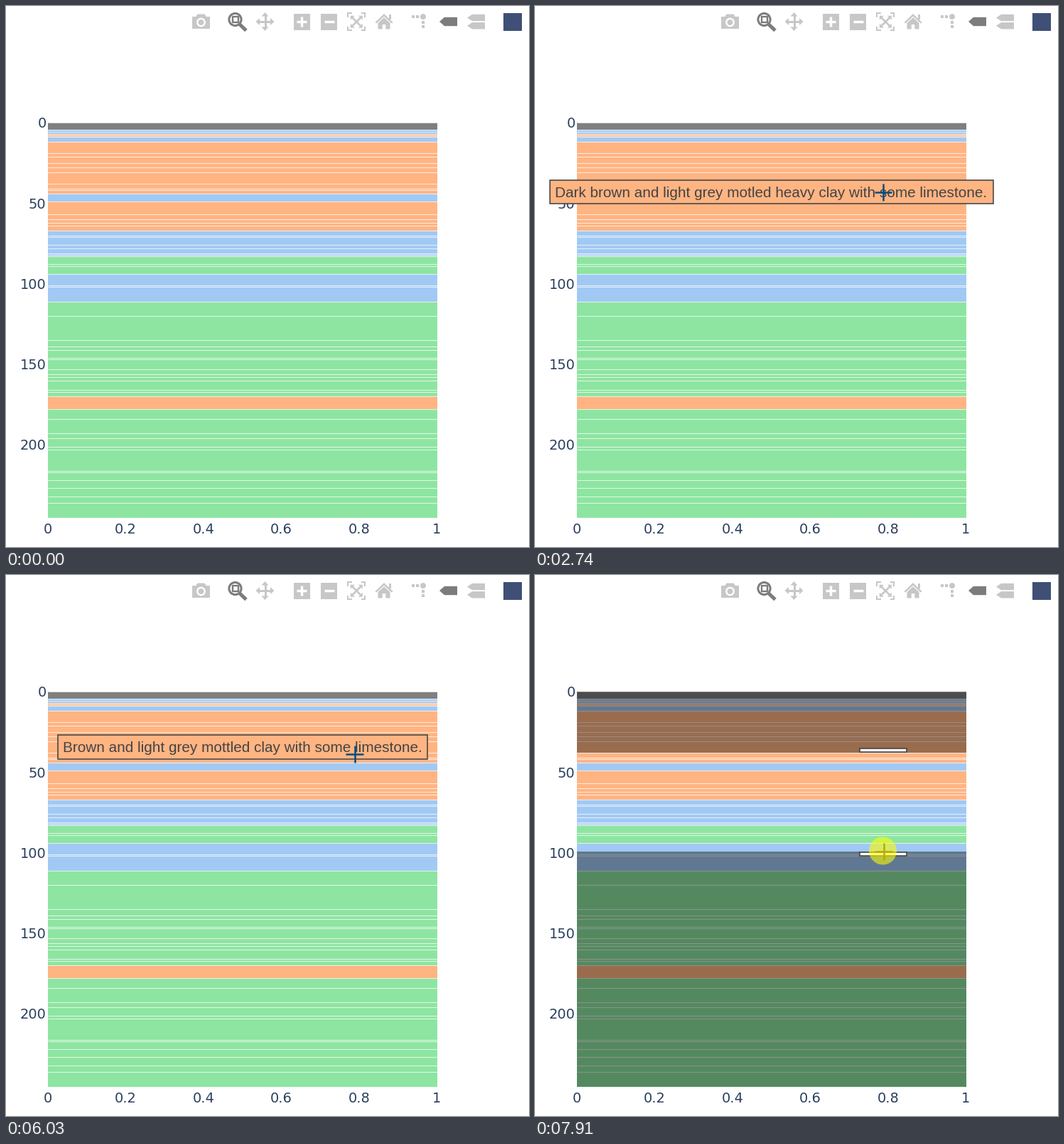
Animation, 736 px wide and 761 px high, one loop 8 s. Source, as a matplotlib script:

```python
import matplotlib.pyplot as plt
from matplotlib.animation import FuncAnimation
from matplotlib.collections import LineCollection
from matplotlib.colors import to_rgb
from matplotlib.patches import Circle, Polygon, Rectangle

W, H, DPI = 736, 761, 64
PT = 72 / DPI
INTERVAL, FRAMES = 40, 200

GREY, BLUE, ORANGE, GREEN = "#7f7f7f", "#a1c9f4", "#ffb482", "#8de5a1"
INK, TICK = "#444444", "#2a3f5f"
ICON, ICON_ON = "#c7c7c7", "#7c7c7c"
LEFT, RIGHT, TOP, SCALE = 58.5, 606.5, 164, 2.2665
DEPTH = 245.5
MID = 332.5

fig = plt.figure(figsize=(W / DPI, H / DPI), dpi=DPI, facecolor="white")
ax = fig.add_axes([0, 0, 1, 1])
ax.set(xlim=(0, W), ylim=(H, 0))
ax.axis("off")


def row(depth):
    return TOP + depth * SCALE


def rect(x0, y0, x1, y1, color, **kw):
    return ax.add_patch(Rectangle((x0, y0), x1 - x0, y1 - y0, fc=color, **{"lw": 0, **kw}))


def poly(points, color, **kw):
    return ax.add_patch(Polygon(points, closed=True, fc=color, **{"lw": 0, **kw}))


def disc(x, y, r, color, **kw):
    return ax.add_patch(Circle((x, y), r, fc=color, **{"lw": 0, **kw}))


def stroke(xs, ys, color, width, **kw):
    return ax.plot(xs, ys, color=color, lw=width * PT, solid_capstyle="butt",
                   solid_joinstyle="miter", **kw)[0]


def write(x, y, s, px, color, font, ha="center", **kw):
    return ax.text(x, y, s, fontsize=px * PT, color=color, family=font,
                   ha=ha, va="baseline", **kw)


# Toolbar
def toolbar():
    # camera
    rect(262, 15, 287, 32, ICON)
    poly([(267, 15.5), (269.5, 11.5), (279.5, 11.5), (282, 15.5)], ICON)
    disc(274.5, 23, 6.4, "white")
    disc(274.5, 23, 4, ICON)
    # zoom
    stroke([329, 338], [26, 34.5], ICON_ON, 5)
    disc(322.5, 19, 8.6, "white", ec=ICON_ON, lw=3 * PT)
    rect(318.5, 15, 326.5, 23, "white", ec=ICON_ON, lw=2.4 * PT)
    # pan
    stroke([355, 374], [22, 22], ICON, 3)
    stroke([364.5, 364.5], [13, 31], ICON, 3)
    for dx, dy in ((1, 0), (-1, 0), (0, 1), (0, -1)):
        tip = (364.5 + 13 * dx, 22 + 13 * dy)
        base = (364.5 + 7.5 * dx, 22 + 7.5 * dy)
        poly([tip, (base[0] + 5 * dy, base[1] + 5 * dx),
              (base[0] - 5 * dy, base[1] - 5 * dx)], ICON)
    # zoom in, zoom out
    for x in (416, 454.5):
        rect(x - 11.5, 11, x + 11.5, 33.5, ICON)
        stroke([x - 7, x + 7], [22.3, 22.3], "white", 3.4)
    stroke([416, 416], [15.3, 29.3], "white", 3.4)
    # autoscale
    for sx in (-1, 1):
        for sy in (-1, 1):
            px = lambda d: 493.3 + sx * d
            py = lambda d: 22.2 + sy * d
            stroke([px(6.5), px(12), px(12)], [py(12), py(12), py(6.5)], ICON, 2)
            stroke([px(0), px(6)], [py(0), py(6)], ICON, 2.6)
            poly([(px(8.5), py(8.5)), (px(8.5), py(2.5)), (px(2.5), py(8.5))], ICON)
    # home
    poly([(519.5, 23), (532, 11), (544.5, 23), (542.8, 24.6), (532, 14.6), (521.2, 24.6)], ICON)
    rect(539, 12, 542, 19, ICON)
    poly([(523.5, 24), (532, 16.2), (540.5, 24), (540.5, 32.5), (534.3, 32.5),
          (534.3, 26), (529.7, 26), (529.7, 32.5), (523.5, 32.5)], ICON)
    # spike lines
    for x, y in ((572.8, 15), (579, 15), (587, 22.8), (587, 29)):
        rect(x - 1.9, y - 1.9, x + 1.9, y + 1.9, ICON)
    disc(587, 15, 4, ICON)
    # hover modes
    tag = lambda x, y, h, c: poly([(x, y), (x + 7, y - h), (x + 25, y - h),
                                   (x + 25, y + h), (x + 7, y + h)], c)
    tag(610, 22, 6.2, ICON_ON)
    tag(649, 16.5, 4.7, ICON)
    tag(649, 27.8, 4.7, ICON)
    rect(699.5, 9.5, 726, 35, "#3f4f75")


# Strata: top depth, colour, inner line depths
STRATA = [
    (0, GREY, []),
    (4.5, BLUE, [5.7]),
    (7, ORANGE, [8]),
    (9, BLUE, []),
    (12, ORANGE, [19, 21, 25, 28, 31, 38, 41, 42]),
    (44, BLUE, []),
    (49, ORANGE, [57, 60, 62, 64]),
    (67, BLUE, [70, 71, 76, 78, 81, 82]),
    (83, GREEN, [88, 89]),
    (94, BLUE, [101, 102]),
    (111, GREEN, [120, 135, 139, 141, 146, 147, 153, 156, 158, 160, 166, 167]),
    (170, ORANGE, []),
    (178, GREEN, [184, 193, 196, 201, 203, 216, 217, 222, 227, 232, 236]),
]


def strata():
    ends = [s[0] for s in STRATA[1:]] + [DEPTH]
    lines = []
    for (top, color, inner), end in zip(STRATA, ends):
        rect(LEFT, row(top), RIGHT, row(end), color)
        lines += [[(LEFT, row(d)), (RIGHT, row(d))] for d in [top] + inner]
    ax.add_collection(LineCollection(lines, colors="white", lw=1.1 * PT, alpha=0.7, zorder=1.5))


def ticks():
    for v in range(0, 201, 50):
        write(56.5, row(v) + 7.2, str(v), 19.4, TICK, "DejaVu Sans", "right")
    for i, s in enumerate(("0", "0.2", "0.4", "0.6", "0.8", "1")):
        write(LEFT + (RIGHT - LEFT) * i / 5, 742, s, 19.4, TICK, "DejaVu Sans")


class Label:
    """Hover label: a filled box with one or two lines of text."""

    def __init__(self, box, fill, lines, arrow_y=None):
        self.box, self.fill = box, to_rgb(fill)
        x0, y0, x1, y1 = box
        pts = [(x0, y0), (x1, y0), (x1, y1), (x0, y1)]
        if arrow_y:
            pts[2:2] = [(x1, arrow_y - 9.6), (RIGHT - 1, arrow_y), (x1, arrow_y + 9.6)]
        self.parts = [poly(pts, fill, ec=INK, lw=1.6 * PT, zorder=5)]
        for x, y, s, ha in lines:
            self.parts.append(write(x, y, s, 20.8, INK, "Liberation Sans", ha, zorder=6))

    def show(self, on):
        for part in self.parts:
            part.set_visible(on)

    def covers(self, x, y):
        x0, y0, x1, y1 = self.box
        return x0 <= x <= x1 and y0 <= y <= y1


def centred(half, cy, fill, s):
    return Label((MID - half, cy - 16.6, MID + half, cy + 16.6), fill,
                 [(MID, cy + 7.2, s, "center")])


toolbar()
strata()
ticks()

labels = {
    "point": Label((278, 295, 595.3, 355), "white",
                   [(283, 318.3, "(1, 71)", "left"),
                    (283, 346, "Light yellow and greey sandy silt.", "left")], 325),
    "brown": centred(260, 242, ORANGE, "Brown and light grey mottled clay with some limestone."),
    "dark": centred(312, 261.5, ORANGE,
                    "Dark brown and light grey motled heavy clay with some limestone."),
    "sandy": centred(207.8, 269.4, BLUE, "Sandy silt. Light orange and grey sandy silt."),
}
LABEL_TIMES = [(0, None), (1270, "point"), (1383, None), (1490, "brown"), (2740, "dark"),
               (3190, "sandy"), (4720, None), (5595, "sandy"), (6030, "brown"), (6150, None)]

# Pointer moves: first step, last step, number of steps, from, to
MOVES = [
    (390, 1170, 8, (672, 717), (615, 349)),
    (1270, 1610, 4, (601, 317), (490, 225)),
    (1850, 2080, 3, (490, 227), (490, 232)),
    (2400, 2740, 4, (490, 234), (490, 262)),
    (3190, 3320, 2, (490, 265), (489, 268)),
    (4510, 5040, 6, (489, 268), (489, 293)),
    (5280, 5386, 2, (489, 297), (489, 302)),
    (5490, 5810, 4, (489, 290), (490, 249)),
    (6030, 6030, 1, (490.5, 252), (490.5, 252)),
    (6150, 6710, 6, (490.5, 250), (490.5, 311)),
    (6810, 6810, 1, (490, 318), (490, 318)),
    (6930, 7700, 8, (490, 326), (490, 386)),
    (7820, 7820, 1, (489.5, 390), (489.5, 390)),
    (7910, 7910, 1, (489.5, 388), (489.5, 388)),
]
CROSS_AT, DRAG_AT, SETTLE_AT = 1270, 6150, 7820
BRUSH_TOP = 249.7

shade_top = rect(LEFT, TOP, RIGHT, BRUSH_TOP, "black", alpha=0.4, zorder=3)
shade_low = rect(LEFT, BRUSH_TOP, RIGHT, row(DEPTH), "black", alpha=0.4, zorder=3)
handle_style = dict(ec=INK, lw=1.6 * PT, zorder=4)
handle_top = rect(457, 243.8, 523, 248.8, "white", **handle_style)
handle_low = rect(457, 243.8, 523, 248.8, "white", **handle_style)
spot = disc(0, 0, 19.5, "#ffff00", alpha=0.58, zorder=9)
drag_parts = [shade_top, shade_low, handle_top, handle_low, spot]

cross = LineCollection([], lw=2.5 * PT, capstyle="butt", zorder=8)
ax.add_collection(cross)
ARROW = [(0, 0), (0, 20.5), (4.6, 16.2), (7.8, 23), (10.8, 21.6), (7.7, 15), (14.3, 15)]
arrow = poly(ARROW, "white", ec="black", lw=1.2 * PT, zorder=8)


def latest(table, t):
    return [entry for entry in table if entry[0] <= t][-1]


def pointer(t):
    t0, t1, n, a, b = latest(MOVES, t)
    f = 0
    if n > 1:
        f = min(int((t - t0) / (t1 - t0) * (n - 1) + 1e-6), n - 1) / (n - 1)
    return a[0] + (b[0] - a[0]) * f, a[1] + (b[1] - a[1]) * f


def inverse_at(x, y, label):
    under = (1, 1, 1)
    if label and label.covers(x, y):
        under = label.fill
    elif LEFT <= x <= RIGHT and TOP <= y <= row(DEPTH):
        under = to_rgb(latest(STRATA, (y - TOP) / SCALE)[1])
    return [1 - c for c in under]


def draw_cross(x, y, label):
    arms = [(-1, 0), (1, 0), (0, -1), (0, 1)]
    cross.set_segments([[(x, y), (x + 12.3 * dx, y + 12.3 * dy)] for dx, dy in arms])
    cross.set_color([inverse_at(x + 6 * dx, y + 6 * dy, label) for dx, dy in arms])


def update(n):
    t = n * INTERVAL + 30
    key = latest(LABEL_TIMES, t)[1]
    for name, label in labels.items():
        label.show(name == key)

    moving, dragging = t >= MOVES[0][0], t >= DRAG_AT
    arrow.set_visible(moving and t < CROSS_AT)
    cross.set_visible(t >= CROSS_AT)
    for part in drag_parts:
        part.set_visible(dragging)
    if not moving:
        return []

    x, y = pointer(t)
    if t < CROSS_AT:
        arrow.set_xy([(x + dx, y + dy) for dx, dy in ARROW])
    else:
        draw_cross(x + dragging, y + dragging, labels.get(key))
    if dragging:
        edge = 389 if t >= SETTLE_AT else max(BRUSH_TOP, y - 4)
        shade_low.set_y(edge)
        shade_low.set_height(row(DEPTH) - edge)
        handle_low.set_y(edge + 0.8)
        spot.center = (x, y)
    return []


anim = FuncAnimation(fig, update, frames=FRAMES, interval=INTERVAL,
                     init_func=lambda: update(0), repeat=True, repeat_delay=0)
plt.show()
```
